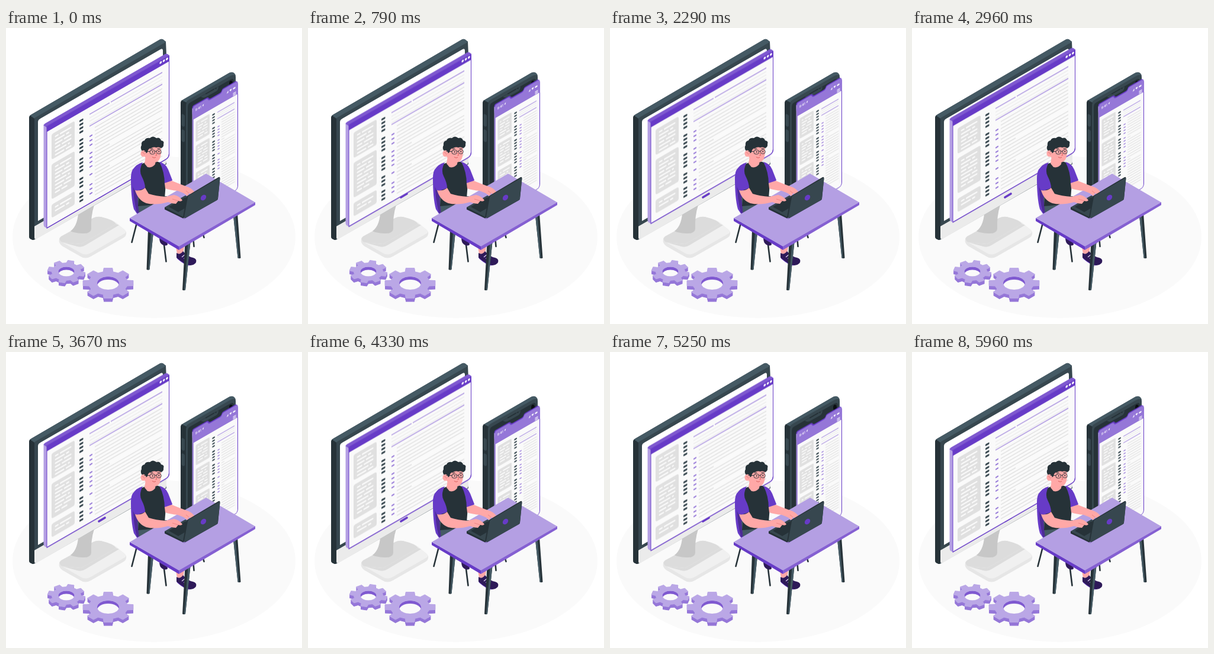
An HTML page that plays this animation: 500x500 px, repeating every 6000 ms.

```html
<!DOCTYPE html>
<html lang="en">
<head>
<meta charset="utf-8">
<title>Working on two screens</title>
<style>
  html, body { margin: 0; width: 100%; height: 100%; overflow: hidden; background: #fff; }
  svg { display: block; width: 100vw; height: 100vh; }
  .float { animation: float 6s linear infinite; }
  .ahead { animation-delay: -1s; }
  @keyframes float { 50% { transform: translateY(-10px); } }
  .p { fill: #673bc7; }
  .m { fill: #9577d8; }
  .l { fill: #b49fe3; }
  .d { fill: #263238; }
  .s { fill: #37474f; }
  .t { fill: #455a64; }
  .g { fill: #e0e0e0; }
  .w { fill: #fafafa; }
  .skin { fill: #ffa8a7; }
  .line { fill: none; stroke: #263238; stroke-linecap: round; stroke-linejoin: round; }
  text { font: 600 4.8px Inter, Arial, sans-serif; fill: #fff; }
</style>
</head>
<body>
<svg viewBox="0 0 500 500">
  <ellipse cx="250" cy="353" rx="239" ry="137" class="w"/>

  <!-- monitor stand -->
  <path d="M90 356Q88 364 96 369L126 386Q134 391 143 386L199 354Q204 351 203 344L150 330Z" fill="#e6e6e6"/>
  <path d="M93 352L147 321Q155 317 164 320Q183 324 191 333L201 341Q205 345 199 348L143 380Q134 385 126 380L95 362Q87 357 93 352Z" fill="#f0f0f0"/>
  <path d="M108 344L147 321Q155 317 164 320Q181 324 186 331L127 365L95 362Q87 357 93 352Z" fill="#dcdcdc"/>
  <path d="M95 362L127 365L186 331L191 333L134 367Q128 371 120 369Z" fill="#dcdcdc"/>
  <path d="M122 314L149 299Q143 318 144 340Q142 348 129 347Q114 346 109 343Q120 335 122 314Z" fill="#c7c7c7"/>

  <!-- monitor -->
  <path class="s" d="M39 152Q39 148 43 146L259 20Q262 18 264 19L270 23L271 45V230L49 357Q46 359 43 357Q39 356 39 352Z"/>
  <path class="t" d="M40 148L259 20Q262 18 265 19L270 23Q269 25 266 26L50 151Q48 152 47 154Z"/>
  <path class="d" d="M39 152Q39 149 41 148L48 153V357Q45 359 43 357Q39 356 39 352Z"/>
  <path fill="#fff" d="M54 159Q54 155 58 153L261 36Q265 34 265 38V205L54 326Z"/>
  <path d="M48 335L271 207V226Q271 229 268 231L52 356Q48 358 48 354Z" fill="#ebebeb"/>
  <path d="M157 286L167 280" stroke="#673bc7" stroke-width="3.600" stroke-linecap="round"/>

  <!-- desktop window -->
  <g class="float">
    <path class="l" d="M63.500 163L69 167V338L66 336.500Q63.500 335 63.500 332Z"/>
    <path d="M63.500 164.500Q64 162.500 66 161.300L267.500 44.800Q270.500 42.500 273 44L276 46.500L69 168Z" fill="#7f59d0"/>
    <g transform="matrix(1 -.577 0 1 69 166)">
      <path class="w" d="M0 0H206.500V166Q206.500 172 200 172H0Z" stroke="#673bc7"/>
      <path d="M0 172H200Q206.500 172 206.500 166" fill="none" stroke="#673bc7" stroke-width="1.500"/>
      <path class="p" d="M0 1Q0 0 1 0H205Q207 0 207 2V9.500H0Z"/>
      <g fill="#fff">
        <circle cx="192.300" cy="3.300" r="1.900"/><circle cx="197.600" cy="3.300" r="1.900"/><circle cx="202.900" cy="3.300" r="1.900"/>
      </g>
      <g id="desk" transform="translate(0 -1)"></g>
    </g>
  </g>

  <!-- phone -->
  <path class="s" d="M295 127Q295 123 299 121L375 77Q381 73 385 76Q388 78 388 83V262L338 290L300 290L295 260Z"/>
  <path class="t" d="M296 123L375 77Q381 73 385 76L388 80Q384 78 379 81L309 121Q305 123 304 127Z"/>
  <path class="d" d="M295 127Q295 124 297 122L305 126Q304 128 304 132V285L295 265Z"/>
  <path class="d" d="M307 134Q307 128 311 126L379 87Q385 84 385 90V262L338 289H307Z"/>
  <path class="s" d="M296.500 147Q297 144 300 146L302 148V165Q301 168 298 166L296.500 164ZM296.500 173Q297 170 300 172L302 174V191Q301 194 298 192L296.500 190Z"/>
  <path class="s" d="M329 116Q333 119 337 117L355 107Q359 104 359 99L329 116Z"/>
  <path d="M338 111L351 103.500" class="line" stroke-width="2"/>
  <circle cx="354.500" cy="102" r="1.300" class="d"/>
  <ellipse cx="380" cy="94" rx="3" ry="5.200" fill="#0b0f12"/>

  <!-- phone window -->
  <g class="float ahead">
    <g transform="matrix(1 -.577 0 1 316 136.300)">
      <path class="p" d="M-1.500 2Q-1.500 -1.800 1 -1.800H23Q25.500 -1.800 26 0Q27 3 30 3H45Q48 3 48.500 0Q49 -1.800 51.500 -1.800H72L75 1V12H-1.500Z"/>
      <path class="l" d="M-1.500 2L0 3V183L-1.500 181.500Z"/>
      <path class="w" d="M0 10H75.500V177Q75.500 183 70 183H0Z" stroke="#673bc7" stroke-width=".9"/>
      <path class="m" d="M0 3Q0 0 3 0H22Q24.500 0 25 2Q26 5 29 5H45Q48 5 49 2Q49.500 0 52 0H71Q76 0 76 5V22H0Z"/>
      <text x="3.800" y="10">9:41</text>
      <path d="M15.300 7.500L18.300 5.500L17.100 9.700L16.600 7.800Z" fill="#fff"/>
      <g fill="#fff">
        <path d="M56.500 10.500L59.500 7V10.500Z"/><path d="M61.500 8Q63.500 6 65.500 8L63.500 10.500Z"/>
        <rect x="67.500" y="7.500" width="4" height="2.600" rx=".7"/>
        <path d="M67.500 16h5v.9h-5zM67.500 18h5v.9h-5zM67.500 20h5v.9h-5z"/>
      </g>
      <g id="hand"></g>
    </g>
  </g>

  <!-- chair and far legs -->
  <path class="line" stroke-width="2.600" d="M221 329L212.500 362M266 358L270.500 394.500M316 352L317.500 369M332 345L334.500 354"/>
  <path class="p" d="M217 236Q211 240 211 254Q211 288 216 306L222 315L232 316L226 240Z"/>
  <path d="M219 238Q214 242 214 256Q215 289 221 312L229 315L222 260Z" fill="#4d2c95"/>
  <path d="M259 354Q259 363 264 366Q270 369 273 366L272 359Z" fill="#2e1a59"/>
  <path class="skin" d="M287 370H301L299 382L289 381Z"/>
  <path d="M288 380Q294 384 299 377Q306 386 316 388Q323 390 321 396Q316 403 305 400Q296 396 288 388Z" fill="#2e1a59"/>
  <path d="M302 383L297 387M305.500 385.500L300.500 389.500M309 387.500L304 391.500" stroke="#e9e0fa" stroke-width="1.100"/>
  <path d="M289 389Q300 399 310 401" fill="none" stroke="#673bc7" stroke-width="1"/>

  <!-- body -->
  <path class="t" d="M222 286L272 284V312L225 316Z"/>
  <path class="d" d="M226 231L238 226L257 226L267 231Q271 245 270 262L268 288L246 299L223 301Q227 270 226 231Z"/>
  <path class="skin" d="M236 216L253 222L252 230Q247 237 239 235L234 229Z"/>
  <path class="p" d="M231 227Q219 230 214 240Q208 254 217 274Q227 275 235 270Q235 262 229 250Q224 240 231 227Z"/>
  <path class="p" d="M259 226Q270 229 274 239L281 257Q277 263 268 264Q268 243 259 226Z"/>

  <!-- head -->
  <path class="skin" d="M236 203L261 199Q263 208 261 217Q259 226 252 227Q242 228 238 222L234 217Z"/>
  <path class="d" d="M230 208Q226 203 229 198Q228 191 234 190Q236 185 243 186Q248 181 254 186Q260 184 262 190Q268 191 266 196Q267 201 262 203Q258 200 254 202Q249 200 245 203Q240 203 239 210L236 212Z"/>
  <ellipse cx="232" cy="212" rx="4.600" ry="5.600" class="skin"/>
  <path d="M230 210Q233 210 234 214" fill="none" stroke="#e87d7c" stroke-width=".9"/>
  <g class="line" stroke-width=".9">
    <rect x="243" y="206" width="8.500" height="7" rx="3"/>
    <rect x="254.500" y="205.500" width="7.500" height="7" rx="3"/>
    <path d="M251.500 208.500L254.500 208M243 208.500L234 208.500M244 204L248 203.500M256 203.500L260 203.500"/>
  </g>
  <circle cx="247.800" cy="209.300" r="1.100" class="d"/><circle cx="258.300" cy="208.800" r="1.100" class="d"/>
  <path d="M253 211L254.500 215L252.500 215.500M247 218Q250 220.500 253 218.500" fill="none" stroke="#d9605f" stroke-width="1"/>

  <!-- table -->
  <path class="d" d="M240 341L249 345L242.500 408Q240 409.500 237.500 408ZM302.500 362L311.500 362L303 442.500Q300.500 444 298 442.500ZM384 317L391 313L396.500 388.500Q394 390 391.500 388.500Z"/>
  <path class="t" d="M245 343L249 345L242.500 408L240.500 408.500ZM307.500 362L311.500 362L303 442.500L301 443ZM384 317L387.500 315L393.500 389L391.500 388.500Z"/>
  <path class="p" d="M209 321L292 368V375L209 326Z"/>
  <path d="M292 368L421 294V299L292 375Z" fill="#8560d2"/>
  <path class="l" d="M338 246L421 294.500L292 369L209 321Z"/>

  <!-- laptop and arms -->
  <path d="M268 306L302 286L358 289L301 323Z" fill="#9279c9"/>
  <path class="d" d="M268 303L303 283L332 299L299 321.500L268 306.500Z"/>
  <path class="s" d="M268 303L303 283L332 299L299 319Z"/>
  <path class="d" d="M275 302L303 286L320 294L291 311Z"/>
  <path class="skin" d="M268 262L280 258Q292 263 303 267Q314 270 318 277L314 281L309 279L307 284L300 279L290 275Q278 274 269 271Z"/>
  <path class="skin" d="M218 274Q228 276 235 270L241 280Q253 284 269 285L284 282Q293 284 298 291Q296 294 291 292L287 297Q280 297 274 294Q253 300 237 296Q223 291 218 274Z"/>
  <path d="M281 289L291 292M304 275L309 279" stroke="#e87d7c" stroke-width=".8"/>
  <path class="d" d="M305 286Q305 284 307 283L359 252Q361 251 361.500 253L358 288Q358 290 356 291L303 321L299 319Z"/>
  <path class="s" d="M307 286Q307 284 309 283L359 254Q361.500 252 361.500 255L358 288Q358 290 356 291L303 321Q301 322 301 319Z"/>
  <ellipse cx="333.500" cy="286.500" rx="5.400" ry="4" class="p" transform="rotate(-48 333.500 286.500)"/>

  <g id="gears"></g>
</svg>
<script>
const $ = id => document.getElementById(id);
const bar = (x, y, w, h, cls, r = 0) =>
  `<rect x="${x}" y="${y}" width="${w}" height="${h}" rx="${r}" class="${cls}"/>`;

// A thumbnail with broken lines of text
function card(x, y, w, h, step) {
  let out = bar(x, y, w, h, 'g', w / 13);
  const pad = w * .14, room = w - pad * 2, th = step * .42;
  for (let i = 0, v = y + step; v < y + h - step * .8; v += step, i++) {
    const cut = room * (.3 + (i * 37 % 50) / 100);
    out += bar(x + pad, v, cut - 2, th, 'w', th / 2);
    out += bar(x + pad + cut, v, (room - cut) * (i % 3 === 1 ? .6 : 1), th, 'w', th / 2);
  }
  return out;
}

const marks = (groups, x, w, h, step, cls) => groups.map(([v, n]) =>
  Array.from({ length: n }, (_, i) => bar(x, v + i * step - h / 2, w, h, cls, h * .3)).join('')).join('');

function rows(from, to, step, x, w, h, short) {
  let out = '';
  for (let i = 0, v = from; v < to; v += step, i++)
    out += bar(x, v, short.includes(i) ? w * .22 : w, h, 'g');
  return out;
}

$('desk').innerHTML =
  card(8, 19, 39, 43, 6.2) + card(8, 70, 39, 59, 6.2) + card(8, 138, 39, 22.5, 6.2) +
  marks([[24.5, 4], [57.5, 4], [90, 4], [123, 3], [147, 3]], 55, 6.5, 3.2, 6.5, 's') +
  marks([[60, 3], [89, 4], [125, 1], [142, 3]], 72, 5, 2.2, 7.6, 'm') +
  bar(72, 21.6, 34, 1.8, 'l') + bar(108, 21.6, 87, 1.8, 'l') + bar(72, 41.6, 123, 1.8, 'l') +
  '<g opacity=".6">' + rows(28, 40, 5.5, 72, 123, 1.3, []) + '</g>' +
  rows(49, 164, 6, 81, 114, 1.6, [7, 13]);

$('hand').innerHTML =
  card(4.5, 28, 23.5, 34.5, 4.6) + card(4.5, 68.5, 23.5, 39, 4.6) + card(4.5, 114, 23.5, 40, 4.6) +
  marks([[33, 4], [56, 4], [79, 4], [102, 4], [125, 4]], 32.3, 4.5, 2.3, 4.8, 's') +
  marks([[58, 4], [81, 4], [104, 1], [114, 4]], 41.3, 3.6, 1.6, 5, 'm') +
  bar(41, 32.5, 29, 1.4, 'l') + bar(41, 43.5, 29, 1.4, 'l') +
  '<g opacity=".6">' + rows(36, 43, 3.6, 41, 29, 1, []) + '</g>' +
  rows(49, 168, 4.2, 48, 22.5, 1.2, [8, 17]);

// Tilted cog: stacked copies give the thickness
function gear(cx, cy, R, hole, turn) {
  const ky = .6, pts = [], at = (r, a) =>
    (cx + r * Math.cos(a)).toFixed(1) + ' ' + (cy + r * ky * Math.sin(a)).toFixed(1);
  for (let i = 0; i < 8; i++) {
    const a = turn + i * Math.PI / 4;
    pts.push(at(R * .77, a - .25), at(R, a - .17), at(R, a + .17), at(R * .77, a + .25));
  }
  const d = 'M' + pts.join('L') + 'Z';
  let out = '';
  for (let z = 6; z > 0; z -= .5)
    out += `<path d="${d}" class="m" transform="translate(0 ${z})"/>`;
  const ry = hole * ky, clip = 'hole' + cx;
  return out + `<path d="${d}" fill="#baa7e6" stroke="#baa7e6" stroke-linejoin="round"/>
    <clipPath id="${clip}"><ellipse cx="${cx}" cy="${cy}" rx="${hole}" ry="${ry}"/></clipPath>
    <g clip-path="url(#${clip})">
      <ellipse cx="${cx}" cy="${cy}" rx="${hole}" ry="${ry}" fill="#7f59d0"/>
      <ellipse cx="${cx}" cy="${cy + 5}" rx="${hole}" ry="${ry}" class="w"/>
    </g>`;
}
$('gears').innerHTML = gear(102, 411.5, 32, 13.5, .25) + gear(172.5, 431, 43, 18.5, 0);
</script>
</body>
</html>
```
